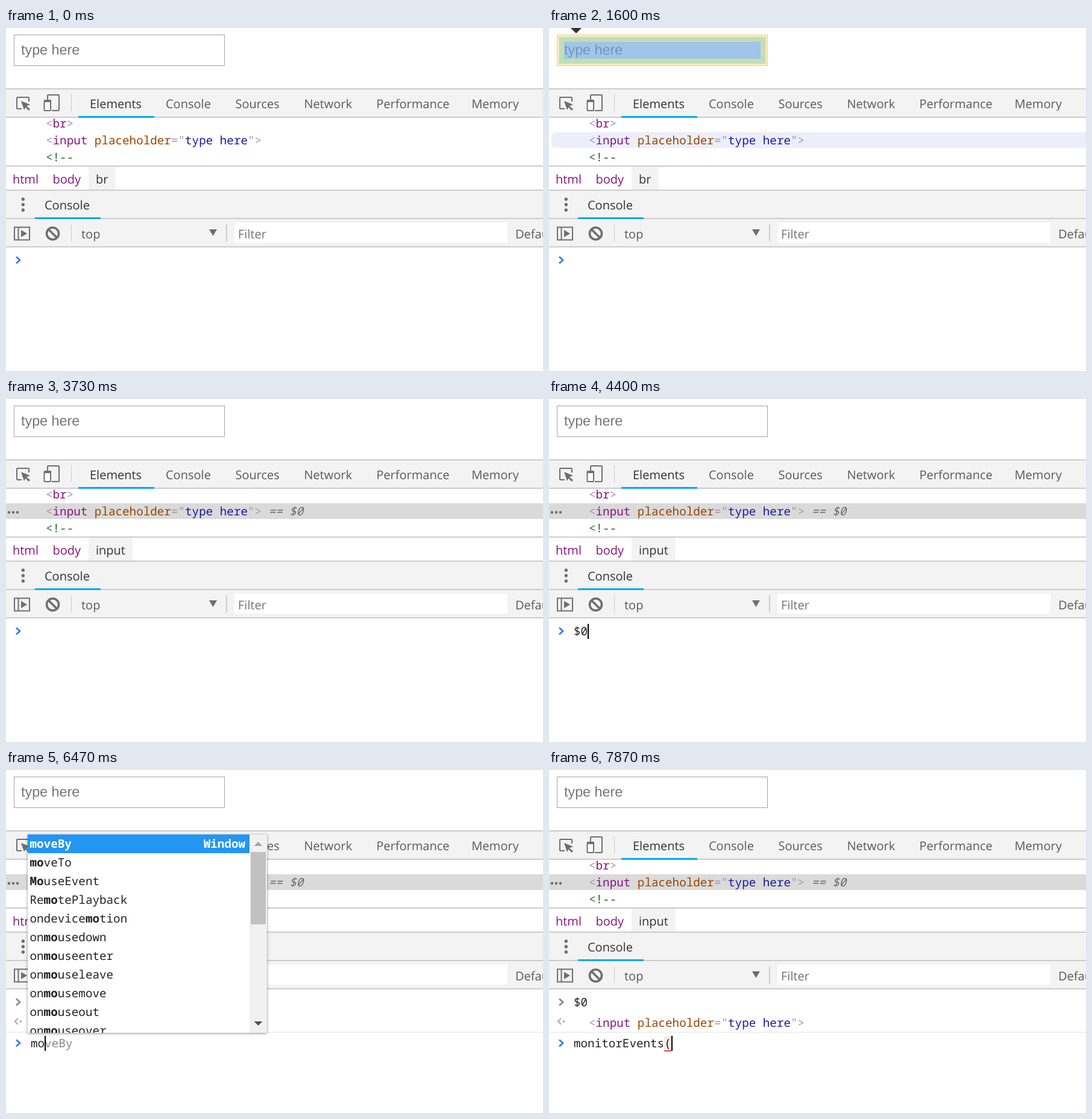
An HTML page that plays this animation: 891x569 px, repeating every 8 s.

```html
<!DOCTYPE html>
<html lang="en">
<head>
<meta charset="utf-8">
<title>Console demo</title>
<style>
  html, body { margin: 0; width: 100%; height: 100%; overflow: hidden; background: #fff; }
  svg { display: block; }
  #stage { width: 891px; height: 569px; }
  text { white-space: pre; text-rendering: geometricPrecision; }
  .ui { font: 20px "Open Sans", "Noto Sans", sans-serif; fill: #5a5a5a; }
  .mono { font: 19.25px "Noto Sans Mono", "DejaVu Sans Mono", monospace; fill: #222; }
  .field { font: 23.33px "Liberation Sans", Arial, sans-serif; fill: #757575; }
  .shadow { filter: drop-shadow(0 1px 2px rgba(0, 0, 0, .45)); }
</style>
</head>
<body>
<svg id="stage" viewBox="0 0 891 569">
  <g id="chrome"></g>
  <g id="live"></g>
</svg>
<script>
const LOOP = 8000, CHAR = 11.55, ROW = 31;
const GREY = '#6e6e6e', BLUE = '#2196f3', LINE = '#ccc', BAR = '#f3f3f3', HOVER = '#ebeffb';
const chrome = document.getElementById('chrome');
const live = document.getElementById('live');

function el(parent, tag, attrs, text) {
  const node = document.createElementNS('http://www.w3.org/2000/svg', tag);
  for (const key in attrs) node.setAttribute(key, attrs[key]);
  if (text !== undefined) node.textContent = text;
  parent.append(node);
  return node;
}
const box = (p, x, y, width, height, fill, more) =>
  el(p, 'rect', { x, y, width, height, fill, ...more });
const path = (p, d, more) => el(p, 'path', { d, fill: 'none', ...more });
const label = (p, x, y, text, fill, cls = 'ui') =>
  el(p, 'text', { x, y, class: cls, ...(fill && { fill, style: `fill:${fill}` }) }, text);
const clip = (p, x, y, width, height) =>
  el(p, 'svg', { x, y, width, height, viewBox: `${x} ${y} ${width} ${height}` });

// Monospaced line made of [text, colour, style] runs
function code(p, x, y, runs) {
  const line = el(p, 'text', { x, y, class: 'mono' });
  for (const [text, fill, style = ''] of runs)
    el(line, 'tspan', { style: `fill:${fill};${style}` }, text);
}

const BRACKET = '#a894a6', TAG = '#881280', ATTR = '#994500', VALUE = '#1a1aa6';
const INPUT_TAG = [
  ['<', BRACKET], ['input', TAG], [' placeholder', ATTR], ['="', BRACKET],
  ['type here', VALUE], ['">', BRACKET]
];

function drawChrome(p) {
  box(p, 13.5, 11.5, 349, 51, '#fff', { stroke: '#a3a3a3' });
  label(p, 25, 44, 'type here', null, 'field');

  box(p, 0, 101, 891, 47, BAR);
  box(p, 0, 269, 891, 94, BAR);
  for (const y of [100, 147, 228, 268, 315, 362]) box(p, 0, y, 891, 2, LINE);
  box(p, 120, 146, 126, 3, '#03a9f4');
  box(p, 48, 314, 109, 3, '#03a9f4');

  const tabs = clip(p, 0, 102, 891, 35);
  label(tabs, 139, 133, 'Elements', '#333');
  label(tabs, 265, 133, 'Console');
  label(tabs, 494.5, 133, 'Network');
  label(tabs, 614.5, 133, 'Performance');
  label(tabs, 772.5, 133, 'Memory');

  // Inspect and device icons
  const pen = { stroke: GREY, 'stroke-width': 2 };
  path(p, 'M26 134H19Q18 134 18 133V116Q18 115 19 115H37Q38 115 38 116V122', pen);
  path(p, 'M25 121L40 127L34 129.5L40 134.5L37.5 137L32.5 131.5L30 136Z', { fill: GREY });
  path(p, 'M69 119V112Q69 111 70 111H87Q88 111 88 112V136Q88 137 87 137H76', pen);
  box(p, 63.5, 121, 10.5, 16, '#fff', { ...pen, rx: 1 });
  path(p, 'M63 121H75', { stroke: GREY, 'stroke-width': 4 });
  box(p, 108, 110, 1, 28, LINE);

  label(p, 11, 258, 'html', TAG);
  label(p, 77.5, 258, 'body', TAG);

  for (const cy of [284, 293, 302]) el(p, 'circle', { cx: 28.3, cy, r: 2.7, fill: GREY });
  label(p, 64, 301, 'Console', '#333');

  // Console toolbar
  box(p, 14, 330.5, 25, 21, 'none', pen);
  path(p, 'M20.5 330V352', pen);
  path(p, 'M25 335L35 341L25 347Z', { fill: GREY });
  el(p, 'circle', { cx: 77.5, cy: 341, r: 10, fill: 'none', stroke: GREY, 'stroke-width': 3.6 });
  path(p, 'M70.5 334L84.5 348', { stroke: GREY, 'stroke-width': 3.6 });
  box(p, 108, 326, 1, 28, LINE);
  label(p, 125, 349, 'top');
  path(p, 'M337 334H350L343.5 345Z', { fill: GREY });
  box(p, 365, 326, 2, 28, LINE);
  box(p, 379, 323, 453, 33, '#fff');
  label(p, 385, 349, 'Filter', '#757575');
  label(p, 845, 349, 'Default levels');
}

function drawOverlay(p) {
  path(p, 'M36 0H54L45 9Z', { fill: '#333' });
  const ring = (outer, inner, fill) =>
    path(p, outer + inner, { fill, 'fill-rule': 'evenodd' });
  const edge = 'M13 11H363V63H13Z', pad = 'M16.5 14.5H359.5V59.5H16.5Z', body = 'M25 23H351V51H25Z';
  ring(edge, pad, 'rgba(255,229,153,.66)');
  ring(pad, body, 'rgba(147,196,125,.55)');
  path(p, body, { fill: 'rgba(111,168,220,.66)' });
  box(p, 13.5, 11.5, 349, 51, 'none', { stroke: '#f0cd92' });
}

function drawTree(p, s) {
  const tree = clip(p, 0, 149, 891, 79);
  if (s.row === 'hover') box(tree, 4, 173, 900, 26, HOVER, { rx: 7 });
  if (s.commentHover) box(tree, 4, 201, 900, 28, HOVER, { rx: 7 });
  const picked = s.row === 'blue' || s.row === 'grey', blue = s.row === 'blue';
  if (picked) {
    box(tree, 0, 173, 891, 26, blue ? BLUE : '#dadada');
    for (const cx of [5, 12, 19])
      el(tree, 'circle', { cx, cy: 188, r: 2.2, fill: blue ? '#fff' : GREY });
  }
  code(tree, 66, 165, [['<', BRACKET], ['br', TAG], ['>', BRACKET]]);
  const runs = blue ? INPUT_TAG.map(([t]) => [t, '#fff', 'font-weight:700']) : [...INPUT_TAG];
  const note = blue ? '#a6d5fa' : '#6a6a6a';
  if (picked) runs.push([' == ', note, 'font-style:italic'], ['$0', note, 'font-style:italic']);
  code(tree, 66, 193, runs);
  code(tree, 66, 221, [['<!--', '#236e25']]);

  box(p, 137, 230, picked ? 73 : 45, 38, BAR);
  label(p, 149, 258, picked ? 'input' : 'br', '#333');
}

const chevron = (p, y, stroke) =>
  path(p, `M17 ${y - 5.5}L23 ${y}L17 ${y + 5.5}`, { stroke, 'stroke-width': 2.8 });

function drawConsole(p, s) {
  const dy = [0, 34, 68][s.log];
  if (s.log > 0) {
    chevron(p, 385, '#8a8a8a');
    code(p, 41, 392, [['$0', '#222']]);
  }
  if (s.log > 1) {
    path(p, 'M20 412L15 417L20 422', { stroke: '#b0b0b0', 'stroke-width': 2.4 });
    el(p, 'circle', { cx: 24.5, cy: 417, r: 1.9, fill: '#b0b0b0' });
    if (s.resultHover) box(p, 46, 406, 372, 26, HOVER, { rx: 7 });
    code(p, 66, 426, INPUT_TAG);
    box(p, 0, 434, 891, 2, '#f0f0f0');
  }
  chevron(p, 385 + dy, '#367cf1');
  const end = 41 + s.typed.length * CHAR;
  if (s.typed.endsWith('(')) {
    box(p, end - CHAR, 442, CHAR, 23, '#f6e9e6');
    box(p, end - CHAR, 465, CHAR, 2, '#e5443c');
  }
  const list = s.menu && s.menu.items;
  const ghost = list ? list[0].slice(s.typed.length) : '';
  code(p, 41, 392 + dy, [[s.typed, '#222'], [ghost, '#888']]);
  if (s.caret) box(p, Math.round(end), 373 + dy, 2, 25, '#000');
  if (s.menu) drawMenu(p, s.menu, s.query || s.typed, 368 + dy);
}

function drawMenu(p, { items, right, thumb, note }, query, bottom) {
  const height = Math.min(items.length * ROW, 329), top = bottom - height;
  const width = right - 36, rowWidth = thumb ? width - 29 : width;
  box(p, 36, top, width, height, '#fff', { class: 'shadow' });
  const view = clip(p, 36, top, width, height);
  box(view, 36, top, rowWidth, ROW, BLUE);
  items.forEach((item, i) => {
    const at = item.toLowerCase().indexOf(query.toLowerCase()), to = at + query.length;
    const fill = i ? '#222' : '#fff', bold = 'font-weight:700';
    code(view, 39.5, top + 22 + i * ROW, [
      [item.slice(0, at), fill, i ? '' : bold],
      [item.slice(at, to), fill, bold],
      [item.slice(to), fill, i ? '' : bold]
    ]);
  });
  if (note) code(view, 36 + rowWidth - 7 - note.length * CHAR, top + 22, [[note, '#fff', 'font-weight:700']]);
  if (thumb) {
    const x = right - 29, mid = x + 14.5;
    box(view, x, top, 29, height, '#f1f1f1');
    box(view, x + 2, top + 29, 25, thumb, '#c1c1c1');
    path(view, `M${mid - 7} ${top + 19}h14l-7 -7Z`, { fill: '#a3a3a3' });
    path(view, `M${mid - 7} ${bottom - 19}h14l-7 7Z`, { fill: '#505050' });
  }
}

const words = text => text.split(' ');
const menus = {
  dollar: { right: 108, items: words('$ $$ $x') },
  m: {
    right: 485, thumb: 40, note: 'Window',
    items: words('matchMedia menubar moveBy moveTo Map Math MediaDeviceInfo MediaDevices ' +
      'MediaElementAudioSourceNode MediaEncryptedEvent MediaError')
  },
  mo: {
    right: 433, thumb: 120, note: 'Window',
    items: words('moveBy moveTo MouseEvent RemotePlayback ondevicemotion onmousedown ' +
      'onmouseenter onmouseleave onmousemove onmouseout onmouseover')
  },
  monitor: { right: 255, items: words('monitor monitorEvents unmonitor unmonitorEvents') },
  events: { right: 255, items: words('monitorEvents unmonitorEvents') }
};

// Each step changes part of the previous state
const steps = [
  [0, { row: '', overlay: false, commentHover: false, resultHover: false, sources: false,
        log: 0, typed: '', query: '', caret: false, menu: null }],
  [1330, { sources: true }],
  [1530, { sources: false, row: 'hover' }],
  [1600, { overlay: true }],
  [2330, { row: 'blue' }],
  [3000, { overlay: false, commentHover: true }],
  [3070, { commentHover: false }],
  [3730, { row: 'grey' }],
  [3800, { caret: true }],
  [4130, { typed: '$' }],
  [4200, { menu: menus.dollar }],
  [4400, { typed: '$0', menu: null }],
  [4670, { typed: '', log: 1 }],
  [4730, { log: 2 }],
  [5200, { caret: false }],
  [5530, { overlay: true, resultHover: true }],
  [5670, { overlay: false, resultHover: false }],
  [5730, { caret: true }],
  [6270, { typed: 'm' }],
  [6330, { menu: menus.m }],
  [6400, { typed: 'mo', query: 'm', menu: { ...menus.m, items: menus.m.items } }],
  [6470, { query: '', menu: menus.mo }],
  [6670, { typed: 'mon', menu: menus.monitor }],
  [6730, { typed: 'moni' }],
  [6800, { typed: 'monit' }],
  [6870, { typed: 'monito' }],
  [7000, { typed: 'monitor' }],
  [7200, { typed: 'monitorE', menu: menus.events }],
  [7400, { typed: 'monitorEv' }],
  [7470, { typed: 'monitorEve' }],
  [7530, { typed: 'monitorEven' }],
  [7670, { typed: 'monitorEvent' }],
  [7730, { typed: 'monitorEvents' }],
  [7870, { typed: 'monitorEvents(', menu: null }]
];
let state = {};
const states = steps.map(([at, change]) => ({ at, ...(state = { ...state, ...change }) }));

function draw(s) {
  live.replaceChildren();
  label(live, 380.5, 133, 'Sources', s.sources ? '#333' : null);
  if (s.overlay) drawOverlay(live);
  drawTree(live, s);
  drawConsole(live, s);
}

let shown;
function tick() {
  const t = (performance.now() - start) % LOOP;
  const now = states.filter(s => s.at <= t).pop();
  if (now !== shown) draw(shown = now);
  requestAnimationFrame(tick);
}

drawChrome(chrome);
const start = performance.now();
tick();
</script>
</body>
</html>
```
